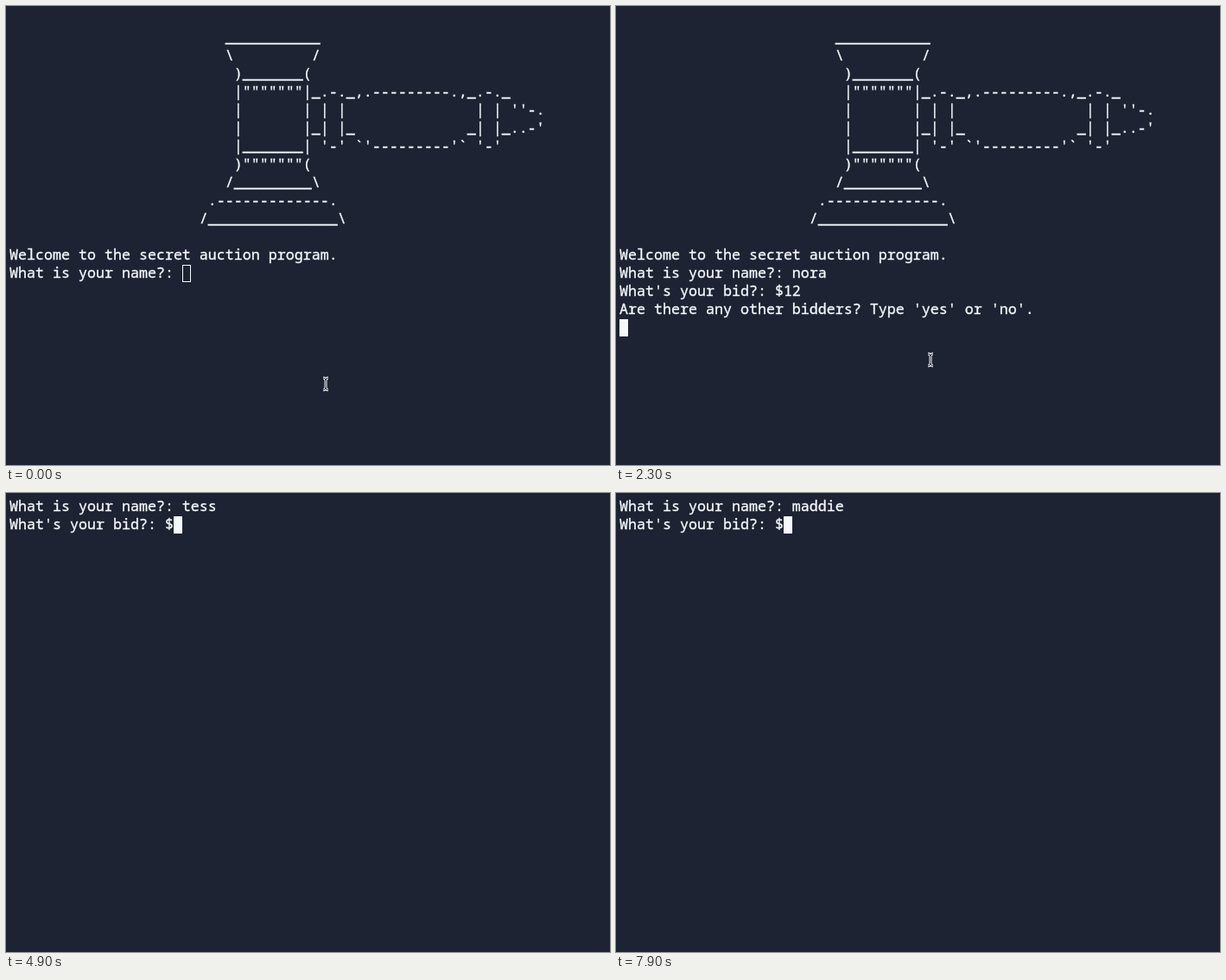
These frames come from a looping animation (699 by 532 pixels, 8000 ms). An HTML page:

```html
<!DOCTYPE html>
<html lang="en">
<head>
<meta charset="utf-8">
<title>Secret auction</title>
<style>
  html, body { margin: 0; width: 100%; height: 100%; overflow: hidden; background: #1d2333; }
  #screen {
    position: absolute; left: 4px; top: 4px; margin: 0;
    font: 500 16.67px/21px "Noto Sans Mono", monospace;
    -webkit-text-stroke: 0.35px #f5f9fc;
    color: #f5f9fc; font-variant-ligatures: none;
  }
  #caret {
    position: absolute; box-sizing: border-box; width: 10px; height: 20px;
    border: 1px solid #f5f9fc;
  }
  #caret.focused { background: #f5f9fc; }
  #pointer { position: absolute; width: 10px; height: 18px; fill: none; }
</style>
</head>
<body>
<pre id="screen"></pre>
<div id="caret"></div>
<svg id="pointer" viewBox="0 0 10 18">
  <defs><path id="beam" d="M2 2 Q5 2 5 5 Q5 2 8 2 M5 5 V13 M2 16 Q5 16 5 13 Q5 16 8 16"/></defs>
  <use href="#beam" stroke="#eef1f4" stroke-width="3"/>
  <use href="#beam" stroke="#1d2333" stroke-width="0.9"/>
</svg>
<script>
const LOOP = 8000, CELL = 10, ROW = 21, LEFT = 4, TOP = 6;

const INTRO = String.raw`
                         ___________
                         \         /
                          )_______(
                          |"""""""|_.-._,.---------.,_.-._
                          |       | | |               | | ''-.
                          |       |_| |_             _| |_..-'
                          |_______| '-' ~'---------'~ '-'
                          )"""""""(
                         /_________\
                       .-------------.
                      /_______________\

Welcome to the secret auction program.
`.replaceAll("~", "`");

const PROMPTS = [
  "What is your name?: ",
  "What's your bid?: $",
  "Are there any other bidders? Type 'yes' or 'no'.\n",
];

// [time in ms, keys typed]; a newline submits the answer
const KEYS = [
  [1000, "n"], [1100, "o"], [1200, "ra"], [1300, "\n"],
  [2000, "1"], [2100, "2"], [2300, "\n"],
  [2900, "y"], [3000, "es"], [3300, "\n"],
  [4500, "t"], [4600, "e"], [4700, "s"], [4800, "s"], [4900, "\n"],
  [5300, "2"], [5400, "3"], [5600, "\n"],
  [6400, "y"], [6500, "e"], [6600, "s"], [6700, "\n"],
  [7100, "m"], [7200, "a"], [7300, "d"], [7500, "d"], [7700, "ie"], [7900, "\n"],
];

const [screenEl, caret, pointer] = ["screen", "caret", "pointer"].map(id => document.getElementById(id));

function textAt(time) {
  let text = INTRO + PROMPTS[0], prompt = 0;
  for (const [start, keys] of KEYS) {
    if (start > time) break;
    if (keys !== "\n") { text += keys; continue; }
    prompt = (prompt + 1) % PROMPTS.length;
    // the screen is cleared for each new bidder
    text = (prompt ? text + "\n" : "") + PROMPTS[prompt];
  }
  return text;
}

function place(el, x, y) {
  el.style.left = x + "px";
  el.style.top = y + "px";
}

function draw() {
  const time = performance.now() % LOOP;
  const text = textAt(time);
  if (screenEl.textContent !== text) screenEl.textContent = text;

  const lines = text.split("\n");
  place(caret, LEFT + lines.at(-1).length * CELL, TOP + (lines.length - 1) * ROW);
  caret.classList.toggle("focused", time >= 600);

  pointer.style.display = time < 2900 ? "block" : "none";
  if (time < 100) place(pointer, 365, 429);
  else place(pointer, 359, 401);
  requestAnimationFrame(draw);
}
draw();
</script>
</body>
</html>
```
